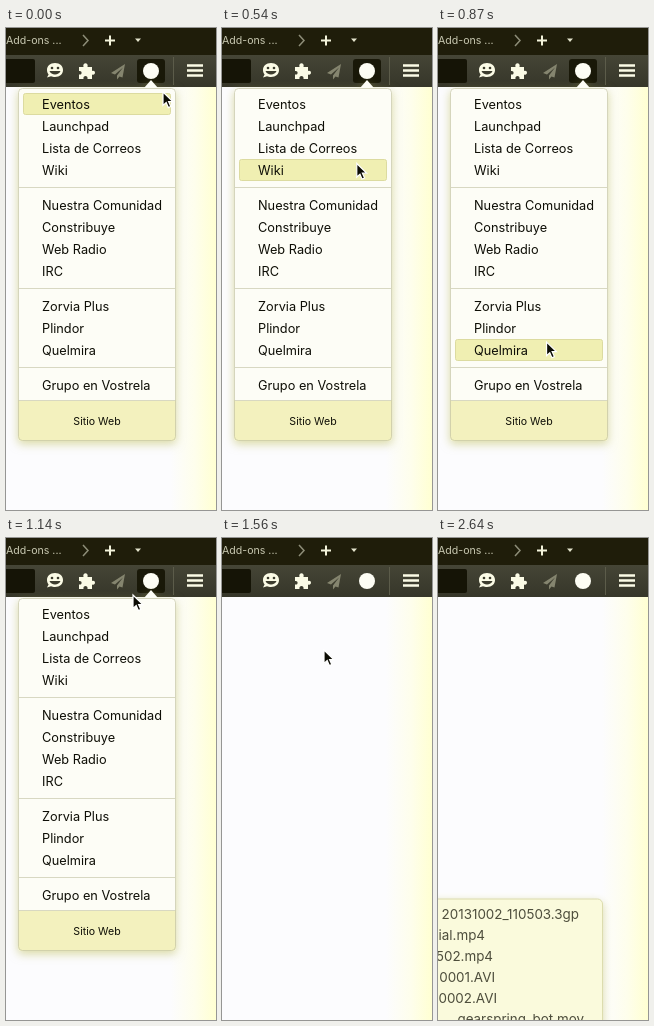
These frames come from a looping animation (210 px wide and 482 px high, 2.67 s). An HTML page:

```html
<!DOCTYPE html>
<html lang="es">
<head>
<meta charset="utf-8">
<title>Menú</title>
<style>
  html, body { margin: 0; width: 100%; height: 100%; overflow: hidden; background: #fcfcfe; }
  svg { display: block; font: 12.75px Inter, "Open Sans", sans-serif; }
  .panel { filter: drop-shadow(0 3px 5px #b8b84a80); }
  .edge { fill: none; stroke: #c4c4a4; }
  .small { font-size: 10.6px; }
  .files { font-size: 13.4px; text-anchor: end; }
</style>
</head>
<body>
<svg width="210" height="482" viewBox="0 0 210 482">
  <defs>
    <linearGradient id="page">
      <stop offset=".78" stop-color="#fcfcfe"/>
      <stop offset=".9" stop-color="#fefeec"/>
      <stop offset="1" stop-color="#ffffd2"/>
    </linearGradient>
    <linearGradient id="bar" x2="0" y2="1">
      <stop stop-color="#454536"/>
      <stop offset="1" stop-color="#363629"/>
    </linearGradient>
  </defs>
  <rect width="210" height="482" fill="url(#page)"/>

  <rect width="210" height="27" fill="#1f1d0a"/>
  <rect y="27" width="210" height="32" fill="url(#bar)"/>
  <rect x="-4" y="31" width="33" height="24" rx="2" fill="#151406"/>
  <text class="small" y="16" fill="#c9c9b2">Add-ons ...</text>
  <path d="M77 7l5 5.500-5 5.500" fill="none" stroke="#8d8d78" stroke-width="1.500"/>
  <path d="M99 12.500h10M104 7.500v10" stroke="#f4f4dc" stroke-width="2"/>
  <path d="M129 10.500h6l-3 3.500z" fill="#e4e4cc"/>
  <path d="M167.500 29v28" stroke="#5c5c4a"/>
  <path d="M181 37.500h16M181 42.500h16M181 47.500h16" stroke="#fbfbe6" stroke-width="2.600"/>

  <g fill="#fbfbe6">
    <path d="M49 35c5 0 8 3 8 7s-3 7-8 7c-1.500 0-3-.3-4-.8l-4 1.300 1.600-3c-1-1.300-1.600-2.800-1.600-4.500 0-4 3-7 8-7z"/>
    <path d="M73 39h4.500c-1.500-5 5.500-5 4 0H86v4c4-1.500 4 5 0 3.500V51h-4.500c1-4-5-4-4 0H73v-4.500c3.500 1 3.500-4.500 0-3.500z"/>
  </g>
  <g fill="#3c3c2e">
    <circle cx="46" cy="40" r="1.300"/>
    <circle cx="52" cy="40" r="1.300"/>
    <path d="M43.500 43h11c-1.500 4.500-9.500 4.500-11 0z"/>
  </g>
  <path d="M119 36l-14 9 4 1.500 8-7-6 8v4l2.500-3 3 1z" fill="#85856f"/>
  <rect id="pressed" x="131" y="31" width="28" height="24" rx="3" fill="#191808"/>
  <circle cx="145" cy="43" r="8" fill="#fdfdf4"/>

  <g id="menu" class="panel">
    <path id="sheet" d="M16 60H138L145 52 152 60H166a4 4 0 0 1 4 4V409a4 4 0 0 1-4 4H16a4 4 0 0 1-4-4V64a4 4 0 0 1 4-4z"/>
    <path id="footer" d="M12 372H170V409a4 4 0 0 1-4 4H16a4 4 0 0 1-4-4z"/>
    <path d="M13 159.500H169M13 260.500H169M13 339.500H169M13 372.500H169" stroke="#d8d8c2"/>
    <rect class="edge" x="12.500" y="60.500" width="157" height="352" rx="4" stroke-opacity=".7"/>
    <rect id="hover" x="17.500" width="147" height="21" rx="2" fill="#f0efb2" stroke="#dcdba0"/>
    <g id="labels"><text class="small" x="91" y="397" text-anchor="middle">Sitio Web</text></g>
  </g>

  <g id="files" class="panel">
    <rect x="-20" y="361" width="184.500" height="150" rx="5" fill="#fafadc" stroke="#dcdcae"/>
    <g id="fileNames" class="files"></g>
  </g>

  <path id="cursor" d="M0 0V13.500L3.200 10.600 5.300 15.600 7.800 14.500 5.600 9.600H9.800Z" fill="#0c0c04" stroke="#fff" stroke-width="1.200"/>
</svg>
<script>
const LOOP = 2670;
const el = id => document.getElementById(id);
const [menu, sheet, footer, hover, labels, pressed, files, fileNames, cursor] =
  ["menu", "sheet", "footer", "hover", "labels", "pressed", "files", "fileNames", "cursor"].map(el);

const groups = [
  [76, "Eventos", "Launchpad", "Lista de Correos", "Wiki"],
  [177, "Nuestra Comunidad", "Constribuye", "Web Radio", "IRC"],
  [278, "Zorvia Plus", "Plindor", "Quelmira"],
  [357, "Grupo en Vostrela"]
];
const recent = [
  ["20131002_110503.3gp", 141], ["ial.mp4", 47], ["502.mp4", 55],
  ["0001.AVI", 57], ["0002.AVI", 59], ["_gearspring_bot.mov", 146]
];

// Keys are [time, value, ...]
const cursorKeys = [
  [0, 157, 64], [330, 149, 36], [450, 148, 39], [660, 115, 280], [840, 108, 322],
  [1140, 127, 57], [1260, 146, 40], [1380, 146, 40], [1560, 102, 112], [1980, 30, 490]
];
const menuKeys = [[0, 1], [330, 1], [390, 0], [450, 0], [510, 1], [1290, 1], [1380, 0]];
const dimKeys = [[0, 0], [300, 0], [330, 1], [390, 1], [420, 0], [1260, 0], [1320, 1]];
const filesKeys = [[0, 0], [2310, 0], [2340, 1], [2610, 1], [2640, .75], [2670, .4]];

function addText(parent, text, x, y) {
  const node = document.createElementNS(parent.namespaceURI, "text");
  node.textContent = text;
  node.setAttribute("x", x);
  node.setAttribute("y", y);
  parent.append(node);
}

const rows = groups.flatMap(([top, ...names]) => names.map((name, i) => {
  const y = top + i * 22;
  addText(labels, name, 36, y + 5);
  return y;
}));
recent.forEach(([name, right], i) => addText(fileNames, name, right, 381 + i * 21));

function sample(keys, t, ease = u => u) {
  const next = keys.findIndex(key => key[0] > t);
  if (next < 0) return keys[keys.length - 1].slice(1);
  const a = keys[next - 1], b = keys[next];
  const u = ease((t - a[0]) / (b[0] - a[0]));
  return a.slice(1).map((v, i) => v + (b[i + 1] - v) * u);
}
const smooth = u => u * u * (3 - 2 * u);
const mix = (a, b, u) => `rgb(${a.map((v, i) => v + (b[i] - v) * u)})`;

function draw(now) {
  const t = now % LOOP;
  const [x, y] = sample(cursorKeys, t, smooth);
  const [shown] = sample(menuKeys, t);
  const [dim] = sample(dimKeys, t);
  const [listed] = sample(filesKeys, t);

  cursor.setAttribute("transform", `translate(${x} ${y})`);
  menu.style.opacity = shown;
  pressed.style.opacity = shown > 0 ? 1 : 0;
  sheet.style.fill = mix([253, 253, 246], [222, 222, 194], dim);
  footer.style.fill = mix([243, 241, 190], [214, 214, 190], dim);
  labels.style.fill = mix([14, 14, 6], [84, 84, 70], dim);

  const row = x > 13 && x < 169 ? rows.find(c => y > c - 14 && y < c + 11) : undefined;
  hover.style.opacity = row && !dim ? 1 : 0;
  if (row) hover.setAttribute("y", row - 10.5);

  files.style.opacity = listed > 0 ? Math.min(1, listed + .25) : 0;
  fileNames.style.fill = mix([14, 14, 6], [76, 76, 58], Math.min(1, (1 - listed) * 4));
}

const start = performance.now();
function tick() {
  draw(performance.now() - start);
  requestAnimationFrame(tick);
}
tick();
</script>
</body>
</html>
```
